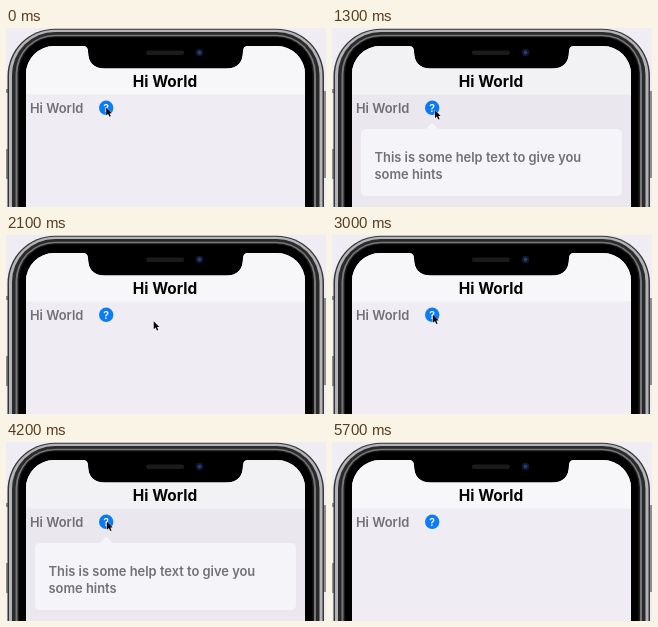
These frames come from a looping animation (320 px wide and 179 px high, 6.3 s). An HTML page:

```html
<!DOCTYPE html>
<html lang="en">
<head>
<meta charset="utf-8">
<title>Help popover</title>
<style>
  html, body { margin: 0; width: 100%; height: 100%; overflow: hidden; background: #efecf3; }
  svg { display: block; width: 100vw; height: 100vh; }
  text { font-family: Inter, "Liberation Sans", sans-serif; font-weight: 600; }
  .title { font-size: 15.4px; font-weight: 700; text-anchor: middle; fill: #050505; }
  .body { font-size: 12.9px; fill: #727176; }
  .mark { font-size: 10.5px; text-anchor: middle; fill: #fff; }
</style>
</head>
<body>
<svg viewBox="0 0 320 179" preserveAspectRatio="none">
  <defs>
    <clipPath id="screen">
      <path d="M20 190V46A28 28 0 0 1 48 18H77Q81.500 18 82 23Q82 40.500 99 40.500H220Q237 40.500 237 23Q237.500 18 242 18H271A28 28 0 0 1 299 46V190Z"/>
    </clipPath>
  </defs>
  <rect width="320" height="179" fill="#efecf3"/>
  <g fill="#8e8e91">
    <rect x="0" y="61" width="3" height="4"/>
    <rect x="0" y="121" width="2" height="30"/>
    <rect x="318" y="63" width="2" height="87"/>
  </g>
  <g id="shell"></g>
  <rect x="140" y="22.500" width="38" height="4.500" rx="2.200" fill="#1b1b1c"/>
  <circle cx="193.500" cy="24.500" r="3.800" fill="#10162c"/>
  <circle cx="193.500" cy="24.500" r="1.900" fill="#243c78"/>

  <g clip-path="url(#screen)">
    <rect x="19" y="18" width="281" height="161" fill="#efecf3"/>
    <rect x="19" y="18" width="281" height="48.500" fill="#f7f6f9"/>
    <text class="title" x="159" y="58.500">Hi World</text>
    <text class="body" x="24" y="84.500">Hi World</text>
    <circle cx="100.200" cy="79.800" r="7.200" fill="#0b7cf6"/>
    <text class="mark" x="100.200" y="83.700">?</text>
    <rect id="dim" x="19" y="18" width="281" height="161"/>
    <g id="popover">
      <path fill="#f5f4f8" d="M34 101H92Q95 101 97 97.500Q100 92.500 103 97.500Q105 101 108 101H285Q290 101 290 106V163Q290 168 285 168H34Q29 168 29 163V106Q29 101 34 101Z"/>
      <text class="body" x="42.500" y="133.600">This is some help text to give you</text>
      <text class="body" x="42.500" y="150.600">some hints</text>
    </g>
  </g>
  <path id="cursor" d="M0 0V8L1.900 6.300L3.200 9.200L4.600 8.600L3.300 5.800H5.700Z" fill="#0a0a0a" stroke="#fff" stroke-width=".7" stroke-linejoin="round" paint-order="stroke"/>
</svg>
<script>
const LOOP = 6300, STEP = 100;
const $ = id => document.getElementById(id);

// Phone edge: inset and colour of each nested ring, thinner along the top
const rings = [[1.5, '#363638'], [3, '#b4b4b6'], [6, '#2a2a2c'], [9.5, '#77777a'], [11.5, '#1c1c1d'], [13, '#000']];
$('shell').innerHTML = rings.map(([d, c]) =>
  `<rect x="${d}" y="${d * 0.75 - 0.5}" width="${319.5 - 2 * d}" height="260" rx="${49 - d}" fill="${c}"/>`).join('');

// Smooth 0 to 1 between two times
function ease(t, from, to) {
  const k = Math.min(1, Math.max(0, (t - from) / (to - from)));
  return k * k * (3 - 2 * k);
}

// Two showings of the popover; the dimming may linger after it
const shown = (t, linger = 0) =>
  ease(t, 600, 1000) - ease(t, 1600, 2000 + linger) +
  ease(t, 3300, 3600) - ease(t, 4500, 4800 + linger);

// Cursor glides: from, to, x, y
const home = [100.2, 79.5];
const glides = [
  [1200, 1300, 103, 82.3],
  [1300, 1800, 147.7, 86.3],
  [2100, 2700, 102, 80],
  [2800, 3000, 101, 79.8],
  [5300, 5500, 164, 89],
  [5500, 5600, 280, 71]
];

function cursorAt(t) {
  let [x, y] = home;
  for (const [from, to, gx, gy] of glides) {
    const k = ease(t, from, to);
    x += (gx - x) * k;
    y += (gy - y) * k;
  }
  return [x, y];
}

function draw(t) {
  $('popover').setAttribute('opacity', shown(t));
  $('dim').setAttribute('opacity', 0.02 * shown(t, 150));
  $('cursor').setAttribute('transform', `translate(${cursorAt(t)})`);
  $('cursor').setAttribute('visibility', t < 5700 ? 'visible' : 'hidden');
}

const start = performance.now();
function tick() {
  const t = (performance.now() - start) % LOOP;
  draw(Math.floor(t / STEP) * STEP);
  requestAnimationFrame(tick);
}
tick();
</script>
</body>
</html>
```
